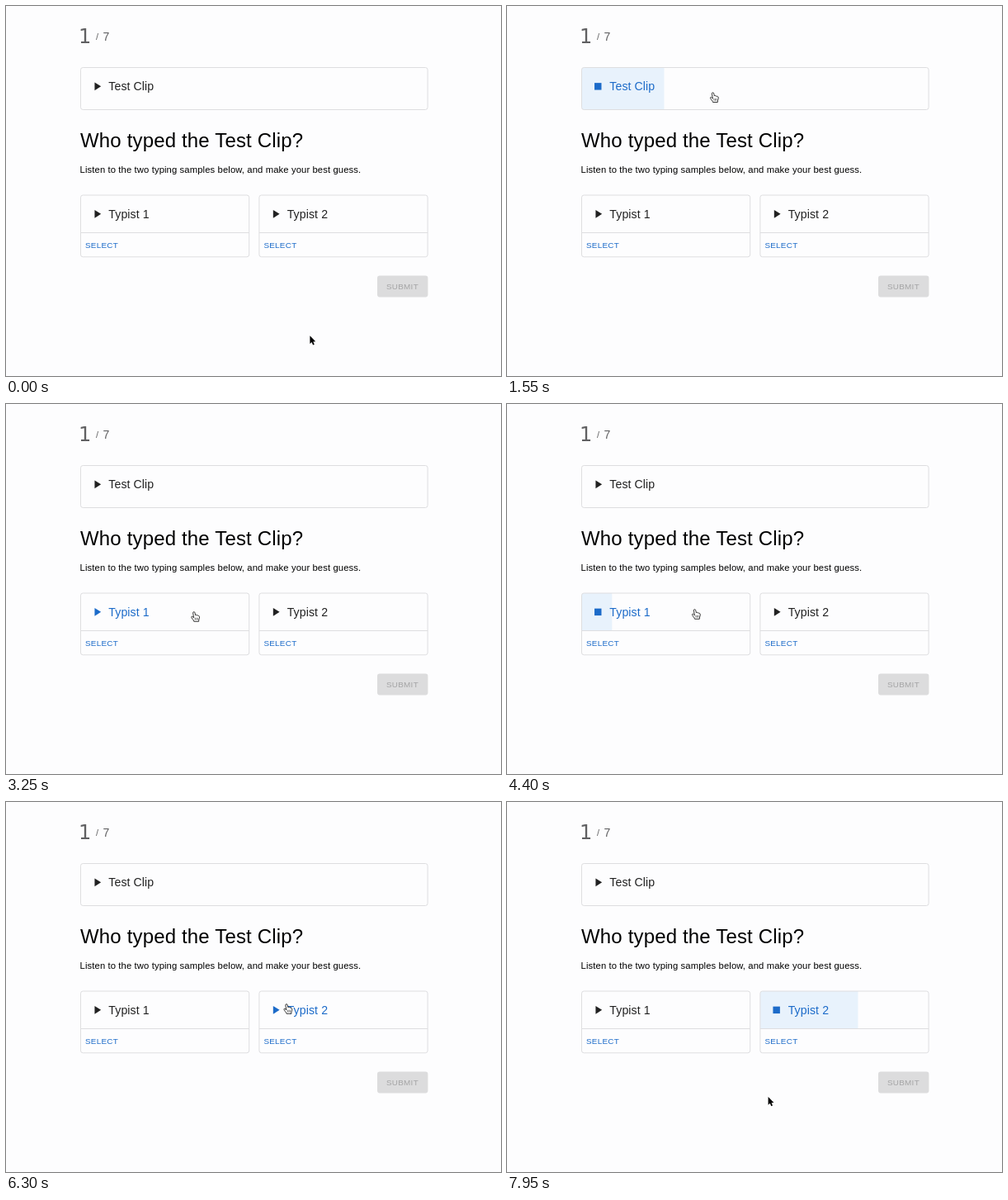
An HTML page that plays this animation: 600x448 px, repeating every 8000 ms.

```html
<!DOCTYPE html>
<html lang="en">
<head>
<meta charset="utf-8">
<title>Typing quiz</title>
<style>
  html, body { margin: 0; width: 100%; height: 100%; overflow: hidden; background: #fdfdfe; }
  svg { display: block; width: 100%; height: 100%; font-family: "Liberation Sans", Arial, sans-serif; }
  .line { fill: none; stroke: #dedee0; }
  .label { font-size: 14.1px; letter-spacing: .0075em; }
  .button { font-size: 9.87px; letter-spacing: .02857em; }
  .title { font-size: 23.97px; letter-spacing: .00735em; }
  .body { font-size: 11.28px; letter-spacing: .00938em; }
</style>
</head>
<body>
<svg viewBox="0 0 600 448">
  <rect width="600" height="448" fill="#fdfdfe"/>
  <g fill="#606062">
    <text x="88" y="45" font-size="24" font-family="DejaVu Sans, sans-serif">1</text>
    <text x="109" y="41" font-size="11">/</text>
    <text x="117.6" y="42" font-size="14.1">7</text>
  </g>
  <text class="title" x="90" y="171.2">Who typed the Test Clip?</text>
  <text class="body" x="89.6" y="201.6">Listen to the two typing samples below, and make your best guess.</text>
  <g id="cards"></g>
  <rect x="450" y="326.6" width="61.4" height="25.8" rx="2.8" fill="#dcdcdd"/>
  <text class="button" x="461" y="343" fill="#a4a4a5">SUBMIT</text>
  <path id="arrow" d="M0 0V9.8L2.2 7.8L3.7 11.2L5.4 10.5L3.9 7.2L6.8 7Z"
        fill="#000" stroke="#fff" stroke-width="1" paint-order="stroke"/>
  <g id="hand" stroke="#222" stroke-width=".9" stroke-linejoin="round" stroke-linecap="round">
    <path fill="#fff" d="M-1.1 .9Q-.9 -.3 0 -.2Q1 -.1 1.2 1L1.9 4Q2.2 3.2 3.2 3.6Q3.8 3.9 3.9 4.2Q4.7 3.7 5.3 4.4L5.5 4.8Q6.5 4.6 6.7 5.6Q7 7.5 6 9.3L5.8 11.5H0L-.4 10.2Q-2 8.5 -3 6.6Q-3.3 5.3 -2 5.4L-.4 6.8Z"/>
    <path fill="none" stroke-width=".6" d="M1.4 7.4V9.4M3 7.4V9.4M4.6 7.4V9.4"/>
  </g>
</svg>
<script>
const LOOP = 8000, STEP = 50, LAG = 425;
const BLUE = '#1c6bc9', DARK = '#212121';
const PLAY = 'M8 5v14l11-7z', STOP = 'M6 6h12v12H6z';
const $ = id => document.getElementById(id);

// h: height of the clickable part; span: clip length in ms
const cards = [
  { name: 'Test Clip', x: 90.5, y: 74.5, w: 420.6, h: 51, start: 700, end: 2950, span: 2030 },
  { name: 'Typist 1', x: 90.5, y: 229, w: 204.2, h: 45.5, start: 3700, end: 5850, span: 1980, select: true },
  { name: 'Typist 2', x: 306.9, y: 229, w: 204.2, h: 45.5, start: 6650, end: LOOP, span: 1541, select: true }
];

// Cursor stops: time, x, y
const stops = [
  [0, 368.4, 399.2], [500, 249.5, 105],
  [2900, 249.5, 105], [3250, 227.8, 251.8], [3500, 227.5, 248.8],
  [4600, 227.5, 248.8], [5100, 253.6, 349.2],
  [5600, 253.6, 349.2], [6150, 338, 247],
  [6250, 338, 247], [6300, 340, 244.8], [6400, 357, 231], [6500, 352, 238],
  [6850, 352, 238], [7350, 316.6, 357], [LOOP, 316.6, 357]
];

function add(parent, tag, attrs, text) {
  const el = document.createElementNS('http://www.w3.org/2000/svg', tag);
  for (const key in attrs) el.setAttribute(key, attrs[key]);
  if (text) el.textContent = text;
  return parent.appendChild(el);
}

function build(card) {
  const { x, y, w, h, select } = card;
  const g = add($('cards'), 'g', {});
  const mid = y + 22.9;
  card.fill = add(g, 'path', { fill: '#e8f2fc' });
  add(g, 'rect', { class: 'line', x, y, width: w, height: select ? 74.8 : h, rx: 2.8 });
  card.face = add(g, 'g', {});
  card.icon = add(card.face, 'path', { transform: `translate(${x + 11.3} ${mid - 8.5}) scale(.705)` });
  add(card.face, 'text', { class: 'label', x: x + 33.8, y: mid + 5 }, card.name);
  if (select) {
    add(g, 'path', { class: 'line', d: `M${x} ${y + h}h${w}` });
    add(g, 'text', { class: 'button', x: x + 5.5, y: 292.8, fill: BLUE }, 'SELECT');
  }
}

const smooth = p => p * p * (3 - 2 * p);

function cursorAt(t) {
  const i = stops.findIndex(s => s[0] > t);
  const [t0, x0, y0] = stops[i - 1], [t1, x1, y1] = stops[i];
  const p = smooth((t - t0) / (t1 - t0));
  return [x0 + (x1 - x0) * p, y0 + (y1 - y0) * p];
}

// The bar trails the clip position by a first-order lag.
function barWidth({ start, span, w }, t) {
  const run = t - start;
  return Math.min(w, w / span * (run - LAG * (1 - Math.exp(-run / LAG))));
}

function barPath({ x, y, h, select }, w) {
  const r = Math.min(2.8, w), low = select ? 0 : r;
  return `M${x + w} ${y}H${x + r}q${-r} 0 ${-r} ${r}V${y + h - low}q0 ${low} ${low} ${low}H${x + w}z`;
}

function draw(t) {
  const [cx, cy] = cursorAt(t);
  let over = false;
  for (const card of cards) {
    const { x, y, w, h, start, end } = card;
    const hover = cx > x && cx < x + w && cy > y && cy < y + h;
    const playing = t >= start && t < end;
    over = over || hover;
    card.face.setAttribute('fill', hover || playing ? BLUE : DARK);
    card.icon.setAttribute('d', playing ? STOP : PLAY);
    card.fill.setAttribute('d', playing ? barPath(card, barWidth(card, t)) : '');
  }
  for (const id of ['arrow', 'hand']) {
    $(id).setAttribute('transform', `translate(${cx} ${cy})`);
    $(id).setAttribute('display', (id === 'hand') === over ? 'inline' : 'none');
  }
}

cards.forEach(build);
const began = performance.now();
function tick() {
  const t = (performance.now() - began) % LOOP;
  draw(Math.floor(t / STEP) * STEP);
  requestAnimationFrame(tick);
}
tick();
</script>
</body>
</html>
```
